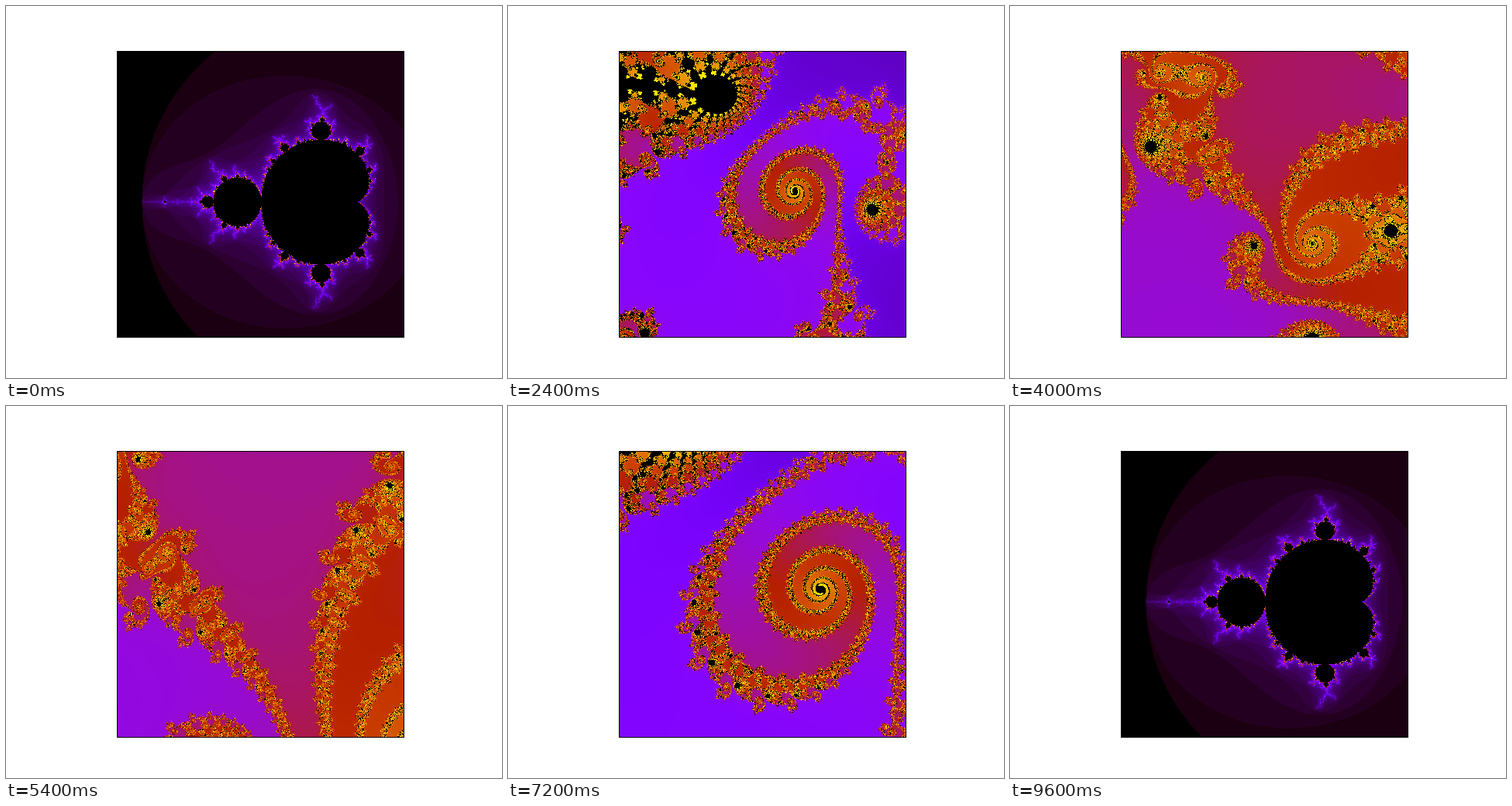
These frames come from a looping animation (640 px wide and 480 px high, 9.8 s). An HTML page with a canvas:

```html
<!DOCTYPE html>
<html lang="en">
<head>
<meta charset="utf-8">
<title>Mandelbrot zoom</title>
<style>
  html, body { margin: 0; width: 100%; height: 100%; overflow: hidden; background: #fff; }
  canvas { display: block; }
</style>
</head>
<body>
<canvas id="stage" width="640" height="480"></canvas>
<script>
const ctx = document.getElementById('stage').getContext('2d');

const STEP = 200, SLOTS = 49, DEEPEST = 24;
const CENTRE = { re: -0.761574, im: 0.0847596 };
const VIEW_WIDTH = 3;
const BOX = { x: 143, y: 58, w: 371, h: 370 };
const PLOT = { cx: 328, cy: 242.4, size: 369.6 };

// Black, violet, red, orange, yellow; packed as ABGR
function makePalette(size) {
  const byte = a => Math.round(255 * Math.max(0, a));
  return Uint32Array.from({ length: size }, (_, n) => {
    const v = n / (size - 1);
    const r = byte(Math.sqrt(v)), g = byte(v ** 3), b = byte(Math.sin(2 * Math.PI * v));
    return (255 << 24 | b << 16 | g << 8 | r) >>> 0;
  });
}

function insideMainBody(re, im) {
  const im2 = im * im, d = re - 0.25, q = d * d + im2;
  return q * (q + d) < 0.25 * im2 || (re + 1) ** 2 + im2 < 0.0625;
}

// Steps until escape, or 0 for points that stay bounded
function escapeCount(re, im, limit) {
  if (insideMainBody(re, im)) return 0;
  let x = re, y = im;
  for (let n = 0; n < limit; n++) {
    const x2 = x * x, y2 = y * y;
    if (x2 + y2 > 4) return n;
    y = 2 * x * y + im;
    x = x2 - y2 + re;
  }
  return 0;
}

// Whole-number magnification, four levels per factor of ten
const zoomAt = level => Math.floor(10 ** (level / 4) + 1e-6);

// Deeper views need more steps
const limitAt = zoom => Math.round(100 + 41 * Math.log10(zoom) ** 1.25);

const cache = new Map();
function render(level) {
  const zoom = zoomAt(level);
  if (!cache.has(zoom)) {
    const image = ctx.createImageData(BOX.w, BOX.h);
    const pixels = new Uint32Array(image.data.buffer);
    const unit = VIEW_WIDTH / zoom / PLOT.size;
    const limit = limitAt(zoom);
    const palette = makePalette(limit);
    for (let j = 0, k = 0; j < BOX.h; j++) {
      const im = CENTRE.im - (BOX.y + j + 0.5 - PLOT.cy) * unit;
      for (let i = 0; i < BOX.w; i++) {
        const re = CENTRE.re + (BOX.x + i + 0.5 - PLOT.cx) * unit;
        pixels[k++] = palette[escapeCount(re, im, limit)];
      }
    }
    cache.set(zoom, image);
  }
  return cache.get(zoom);
}

// In to the deepest level, one repeat, then back out
const levelAt = slot => slot <= DEEPEST ? slot : SLOTS - slot;

function draw(slot) {
  ctx.fillStyle = '#fff';
  ctx.fillRect(0, 0, 640, 480);
  ctx.putImageData(render(levelAt(slot)), BOX.x, BOX.y);
  ctx.strokeStyle = '#000';
  ctx.lineWidth = 1;
  ctx.strokeRect(BOX.x + 0.5, BOX.y + 0.5, BOX.w - 1, BOX.h - 1);
}

const start = performance.now();
let shown = -1;
function tick() {
  const slot = Math.floor((performance.now() - start) / STEP) % SLOTS;
  if (slot !== shown) {
    draw(slot);
    shown = slot;
  } else {
    // Idle frames prepare the next views
    for (let ahead = 1; ahead <= DEEPEST; ahead++) {
      const level = levelAt((slot + ahead) % SLOTS);
      if (!cache.has(zoomAt(level))) {
        render(level);
        break;
      }
    }
  }
  requestAnimationFrame(tick);
}
tick();
</script>
</body>
</html>
```
